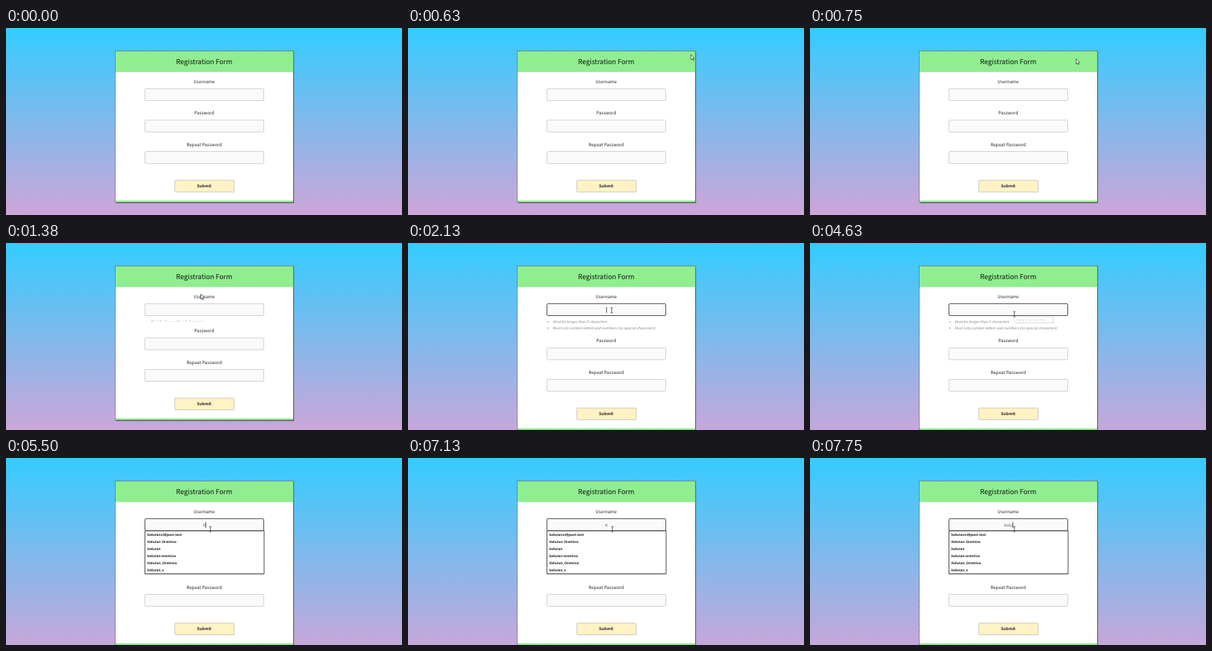
These frames come from a looping animation (560x264 px, 8000 ms). An HTML page:

```html
<!DOCTYPE html>
<html lang="en">
<head>
<meta charset="utf-8">
<title>Registration Form</title>
<style>
  html, body { margin: 0; width: 100%; height: 100%; overflow: hidden; }
  svg { display: block; width: 560px; height: 264px; }
  text {
    font-family: "Noto Sans CJK JP", "Noto Sans CJK SC", "Noto Sans CJK KR", "Noto Sans", sans-serif;
    font-size: 6.25px; fill: #222; text-rendering: geometricPrecision;
  }
  .mid { text-anchor: middle; }
  .title { font-size: 9.65px; fill: #111; }
  .bold { font-size: 5.7px; font-weight: 700; }
  .hint { font-size: 5.1px; font-style: italic; fill: #858585; }
  .typed { font-size: 5.8px; fill: #666; }
  .option { font: 700 4.85px "Open Sans", "Noto Sans", sans-serif; fill: #1c1c1c; }
  .tip { font: 4px "Open Sans", "Noto Sans", sans-serif; fill: #858585; }
  .field { fill: #fafafa; stroke: #cfcfcf; }
</style>
</head>
<body>
<svg viewBox="0 0 560 264">
  <defs>
    <linearGradient id="sky" gradientUnits="userSpaceOnUse" x1="0" y1="0" x2="0" y2="347">
      <stop stop-color="#3cf"/><stop offset="1" stop-color="#f9c"/>
    </linearGradient>
    <filter id="soft"><feGaussianBlur stdDeviation=".6"/></filter>
    <clipPath id="hintClip"><rect id="hintBox" x="190" y="106.5" width="180" height="0"/></clipPath>
  </defs>
  <rect width="560" height="264" fill="url(#sky)"/>

  <rect class="grow" x="156" y="33.5" width="251.2" fill="#000" opacity=".65" filter="url(#soft)"/>
  <rect class="grow" x="154.5" y="32.5" width="252" fill="#fff"/>
  <rect x="154.5" y="32.5" width="252" height="29.7" fill="#90ee90"/>
  <text class="mid title" x="280.3" y="51.4">Registration Form</text>
  <text class="mid" x="280.3" y="78.2">Username</text>
  <rect id="user" class="field" x="196.5" y="85.7" width="168" height="16.8" rx="1.5"/>

  <g clip-path="url(#hintClip)">
    <circle cx="198" cy="111.3" r=".8" fill="#777"/>
    <text class="hint" x="204.5" y="113">Must be longer than 5 characters</text>
    <circle cx="198" cy="120.1" r=".8" fill="#777"/>
    <text class="hint" x="204.5" y="121.8">Must only contain letters and numbers (no special characters)</text>
  </g>

  <g id="rest">
    <text class="mid" x="280.3" y="122.4">Password</text>
    <rect class="field" x="196.5" y="130" width="168" height="16.8" rx="1.5"/>
    <text class="mid" x="280.3" y="166.8">Repeat Password</text>
    <rect class="field" x="196.5" y="174.5" width="168" height="16.8" rx="1.5"/>
    <rect x="238.7" y="215" width="84" height="16.6" rx="1" fill="#fff2c4" stroke="#ccc8bc"/>
    <text class="mid bold" x="280.3" y="225.4">Submit</text>
    <rect x="155" y="243.6" width="251" height="2.2" fill="#90ee90"/>
  </g>
  <rect class="grow" x="154.5" y="32.5" width="252" fill="none" stroke="#333" stroke-width=".8" stroke-dasharray="1.6 1"/>

  <text id="typed" class="mid typed" x="280.5" y="96.6"></text>
  <rect id="caret" y="90.4" width=".8" height="8.2" fill="#222"/>

  <g id="list">
    <rect x="196.5" y="102.9" width="168.5" height="60.5" fill="#fff" stroke="#444"/>
  </g>

  <g id="tip">
    <rect x="290" y="105" width="55" height="8.3" fill="#777" opacity=".6" filter="url(#soft)"/>
    <rect x="289" y="104.2" width="55" height="8" fill="#fff" stroke="#bbb" stroke-width=".6"/>
    <text class="tip" x="291" y="109.7">Please fill out this field.</text>
  </g>

  <path id="arrow" d="M0 0v7.2l1.7-1.5 1.1 2.5 1.1-.5-1.1-2.4h2.3z" fill="#fff" stroke="#222" stroke-width=".7"/>
  <path id="beam" d="M-1.4-3.6h2.8M0-3.6v7.2M-1.4 3.6h2.8" fill="none" stroke="#333" stroke-width=".8"/>
</svg>
<script>
const LOOP = 8000;
const $ = id => document.getElementById(id);
const show = (el, on) => el.setAttribute('visibility', on ? 'visible' : 'hidden');
const clamp = v => Math.max(0, Math.min(1, v));
const move = (el, x, y) => el.setAttribute('transform', `translate(${x} ${y})`);

const options = ['kelutanvi@post.test', 'Kelutan Oremiva', 'kelutan', 'kelutan-oremiva', 'Kelutan_Oremiva', 'kelutan_v'];
options.forEach((name, i) => {
  const line = document.createElementNS('http://www.w3.org/2000/svg', 'text');
  line.setAttribute('class', 'option');
  line.setAttribute('x', 200);
  line.setAttribute('y', 109.6 + i * 10);
  line.textContent = name;
  $('list').append(line);
});

// pointer path: time, x, y
const path = [
  [120, 552, 22], [380, 450, 25], [750, 376.5, 43.5], [1380, 275.5, 72],
  [1740, 288, 95], [2490, 288, 95], [2620, 222, 110], [2870, 222, 110],
  [3000, 217, 111], [3250, 217, 111], [3500, 214, 117], [3750, 240, 114],
  [4000, 281, 103], [4250, 289, 100.5], [LOOP, 289, 100.5]
];
const caretOn = [[2120, 2625], [3140, 3630], [4125, 4625], [5120, 7120], [7490, LOOP]];
const keyTimes = [5120, 7490, 7690, 7740];

function pointer(t) {
  const i = Math.max(1, path.findIndex(p => p[0] > t));
  const [t0, x0, y0] = path[i - 1], [t1, x1, y1] = path[i];
  const k = clamp((t - t0) / (t1 - t0));
  return [x0 + (x1 - x0) * k, y0 + (y1 - y0) * k];
}

function draw(t) {
  const k = clamp((t - 1220) / 530);
  const shift = 18 * k * k * (3 - 2 * k);
  move($('rest'), 0, shift);
  $('hintBox').setAttribute('height', shift);
  $('sky').setAttribute('y2', 347 + shift);
  document.querySelectorAll('.grow').forEach(r => r.setAttribute('height', 213.7 + shift));

  $('user').style.stroke = t >= 2120 ? '#484848' : '';
  $('typed').textContent = 'Kelu'.slice(0, keyTimes.filter(time => t >= time).length);
  const width = $('typed').textContent ? $('typed').getComputedTextLength() : 0;
  $('caret').setAttribute('x', 280.4 + width / 2);
  show($('caret'), caretOn.some(([a, b]) => t >= a && t < b));
  show($('list'), t >= 5240);
  $('tip').setAttribute('opacity', t < 5120 ? clamp((t - 4510) / 280) : 0);

  const [x, y] = pointer(t);
  const inField = x > 196 && x < 365 && y > 85.5 && y < 103;
  move($('arrow'), x, y);
  move($('beam'), x, y);
  show($('arrow'), t >= 120 && !inField);
  show($('beam'), inField);
}

const start = performance.now();
function tick() {
  draw((performance.now() - start) % LOOP);
  requestAnimationFrame(tick);
}
tick();
</script>
</body>
</html>
```
